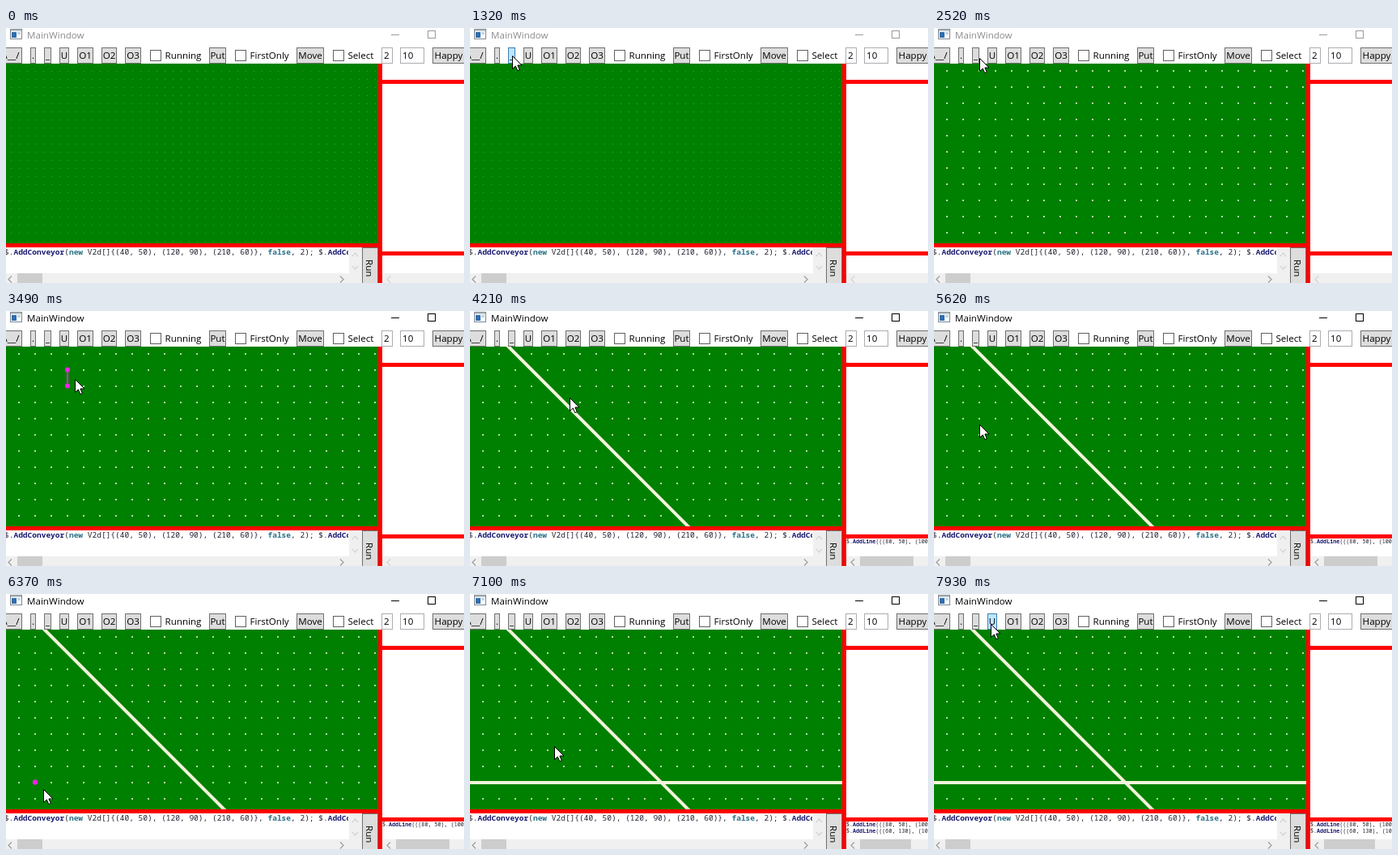
These frames come from a looping animation (566x315 px, 8 s). An HTML page:

```html
<!DOCTYPE html>
<html lang="en">
<head>
<meta charset="utf-8">
<title>MainWindow</title>
<style>
  html, body { margin: 0; width: 100%; height: 100%; overflow: hidden; background: #fff; }
  svg { display: block; width: 566px; height: 315px; }
  text { font: 11.6px "Open Sans", "Noto Sans", sans-serif; fill: #000; white-space: pre; }
  rect { shape-rendering: crispEdges; }
  .code text { font: 9.53px "Noto Sans Mono", "DejaVu Sans Mono", monospace; fill: #223; }
  .code .small { font-size: 6.72px; }
  .code tspan { font-weight: bold; }
  .call { fill: #191970; }
  .word { fill: #2a7088; }
  .btn rect { fill: #ddd; stroke: #707070; }
  .btn.hover rect { fill: #bee6fd; stroke: #3c7fb1; }
  .field { fill: #fff; stroke: #abadb3; }
  .check { fill: #fff; stroke: #606060; }
  .red { fill: #f00; }
  .bar { fill: #f0f0f0; }
  .thumb { fill: #cdcdcd; }
  .arrow { fill: none; stroke: #a0a0a0; stroke-width: 1.3; }
  .faint { stroke: #d4d4d4; }
  .belt { stroke: #f5f5dc; stroke-width: 4; }
  .draft { stroke: #ff20f0; fill: #ff20f0; stroke-width: 2; }
  .draft circle { stroke: none; }
</style>
</head>
<body>
<svg viewBox="0 0 566 315" xmlns="http://www.w3.org/2000/svg">
  <defs>
    <pattern id="dense" x="6" y="43" width="10" height="10" patternUnits="userSpaceOnUse">
      <rect width="1" height="1" fill="#3c9e3c"/>
    </pattern>
    <pattern id="sparse" x="15" y="52" width="20" height="20" patternUnits="userSpaceOnUse">
      <rect width="2" height="2" fill="#b4dcaa"/>
    </pattern>
    <clipPath id="stageClip"><rect y="44" width="460" height="222"/></clipPath>
    <clipPath id="editClip"><rect y="271" width="423" height="32"/></clipPath>
  </defs>
  <rect width="566" height="315" fill="#fff"/>

  <g id="titleBar">
    <rect x="5.5" y="1.5" width="14" height="12" fill="#fff" stroke="#7d8790"/>
    <rect x="6" y="2" width="13" height="2" fill="#b9c2ca"/>
    <rect x="7" y="5" width="6" height="7" fill="#2f6fae"/>
    <rect x="14" y="5" width="4" height="3" fill="#c9d3da"/>
    <text id="title" x="26" y="13">MainWindow</text>
    <g id="winKeys" fill="none">
      <path d="M476 8.5h10M521.5 3.5h9v9h-9z" shape-rendering="crispEdges"/>
    </g>
  </g>

  <g id="tools"></g>

  <rect y="44" width="460" height="222" fill="#008000"/>
  <rect id="grid" y="44" width="460" height="222"/>
  <g clip-path="url(#stageClip)">
    <path id="belt1" class="belt" d="M36 32.5L286 282.5"/>
    <path id="belt2" class="belt" d="M0 233H460"/>
    <g id="draft" class="draft">
      <line/><circle r="3"/><circle r="3"/>
    </g>
  </g>

  <g class="code">
    <g clip-path="url(#editClip)">
      <text x="-2" y="280">$.<tspan class="call">AddConveyor</tspan>(<tspan class="word">new</tspan> V2d[]{(40, 50), (120, 90), (210, 60)}, <tspan class="word">false</tspan>, 2); $.<tspan class="call">AddConveyor</tspan></text>
    </g>
    <text id="log1" class="small" x="465" y="287">$.<tspan class="call">AddLine</tspan>(((80, 50), (100, 70)));</text>
    <text id="log2" class="small" x="465" y="295">$.<tspan class="call">AddLine</tspan>(((60, 130), (100, 130)));</text>
  </g>

  <rect class="bar" x="424" y="271" width="16" height="32"/>
  <path class="arrow faint" d="M428 282l3.500-4 3.500 4M428 294l3.500 4 3.500-4"/>
  <rect class="bar" y="303" width="440" height="12"/>
  <rect class="thumb" x="14" y="303" width="31" height="12"/>
  <path class="arrow" d="M7 306.500l-4 4 4 4M413 306.500l4 4-4 4"/>
  <g class="btn">
    <rect x="440.500" y="271.500" width="19" height="50"/>
    <text transform="translate(445 286) rotate(90)">Run</text>
  </g>
  <rect class="bar" x="465" y="303" width="101" height="12"/>
  <rect id="logThumb" class="thumb" x="482" y="303" height="12"/>
  <path id="logArrow" class="arrow" d="M475 306.500l-4 4 4 4"/>

  <rect class="red" x="460" y="44" width="5" height="271"/>
  <rect class="red" y="266" width="460" height="5"/>
  <rect class="red" x="465" y="64" width="101" height="5"/>
  <rect class="red" x="465" y="276" width="101" height="5"/>

  <path id="pointer" d="M.5 .5V16.500L4.300 13L6.800 18.700L9.300 17.600L6.900 12H12z" fill="#fff" stroke="#000"/>
  <path id="caret" d="M-3-8h2.500l.5 .5 .5-.5H3M0-8V8M-3 8H3" fill="none" stroke="#000"/>
</svg>
<script>
const LOOP = 8000;
const $ = id => document.getElementById(id);

// Toolbar: [kind, left, right, label]
const tools = [
  ["btn", -6, 20, "\\__/"], ["btn", 30, 37, "."], ["btn", 47, 56, "_"],
  ["btn", 66, 78, "U"], ["btn", 88, 108, "O1"], ["btn", 118, 137, "O2"],
  ["btn", 147, 167, "O3"], ["check", 178, 192, "Running"],
  ["btn", 251, 272, "Put"], ["check", 283, 297, "FirstOnly"],
  ["btn", 359, 393, "Move"], ["check", 404, 418, "Select"],
  ["field", 464, 478, "2"], ["field", 487, 517, "10"], ["btn", 527, 567, "Happy"]
];

function make(parent, tag, attrs) {
  const el = document.createElementNS("http://www.w3.org/2000/svg", tag);
  for (const k in attrs) el.setAttribute(k, attrs[k]);
  return parent.appendChild(el);
}

const buttons = [];
for (const [kind, left, right, label] of tools) {
  const g = make($("tools"), "g", { class: kind === "btn" ? "btn" : "" });
  const isCheck = kind === "check";
  make(g, "rect", {
    class: kind === "btn" ? "" : kind,
    x: left + .5, y: isCheck ? 27.5 : 24.5,
    width: right - left - 1, height: isCheck ? 13 : 19
  });
  const x = isCheck ? right + 4.5 : kind === "field" ? left + 3 : (left + right) / 2;
  const text = make(g, "text", { x, y: 38, "text-anchor": kind === "btn" ? "middle" : "start" });
  text.textContent = label;
  if (kind === "btn") buttons.push({ g, left, right });
}

// Pointer path: [ms, x, y]
const path = [
  [160, 463, 302], [340, 401, 274], [520, 195, 152], [600, 150, 120],
  [760, 80, 62], [940, 52, 42], [990, 51, 38], [1120, 52, 35], [1320, 52, 34],
  [1460, 52, 34], [1720, 78, 115], [2140, 78, 115], [2520, 56, 37],
  [2870, 53, 36], [2950, 53, 36], [3250, 74, 70], [3490, 85, 84],
  [3740, 123, 107], [4300, 123, 107], [4420, 130, 115], [4880, 61, 45],
  [5150, 53, 36], [5200, 53, 36], [5450, 66, 100], [5960, 36, 220],
  [6200, 38, 236], [6370, 46, 241], [6570, 107, 241], [6700, 107, 241],
  [6890, 110, 224], [6980, 110, 224], [7400, 90, 100], [7710, 70, 40],
  [7800, 70, 40], [7930, 70, 37]
];

function pointerAt(t) {
  const i = path.findIndex(p => p[0] > t);
  if (i === 0) return null;
  if (i < 0) return path[path.length - 1].slice(1);
  const [t0, x0, y0] = path[i - 1], [t1, x1, y1] = path[i];
  const k = (t - t0) / (t1 - t0);
  return [Math.round(x0 + (x1 - x0) * k), Math.round(y0 + (y1 - y0) * k)];
}

// Lines being dragged: press and release times with the start point
const drags = [
  { from: 3250, to: 4210, x: 76, y: 72.5 },
  { from: 6250, to: 6760, x: 36, y: 232.5 }
];
// Halves round down so the end stays on the nearer dot
const snap = (v, base) => base + 20 * Math.ceil((v - base) / 20 - .5);
const show = (el, on) => { el.style.display = on ? "" : "none"; };

function drawDraft(t, mouse) {
  const drag = drags.find(d => t >= d.from && t < d.to);
  show($("draft"), drag);
  if (!drag) return;
  const x2 = snap(mouse[0], 16), y2 = snap(mouse[1], 52.5);
  const [line, a, b] = $("draft").children;
  const set = (el, attrs) => { for (const k in attrs) el.setAttribute(k, attrs[k]); };
  set(line, { x1: drag.x, y1: drag.y, x2, y2 });
  set(a, { cx: drag.x, cy: drag.y });
  set(b, { cx: x2, cy: y2 });
}

function drawPointer(mouse) {
  const [x, y] = mouse || [-99, -99];
  const inEditor = x >= 0 && x < 424 && y >= 271 && y < 303;
  show($("pointer"), mouse && !inEditor);
  show($("caret"), inEditor);
  $(inEditor ? "caret" : "pointer").setAttribute("transform", `translate(${x} ${y})`);
  for (const { g, left, right } of buttons)
    g.classList.toggle("hover", x >= left && x < right && y >= 24 && y < 44);
}

function draw(t) {
  const mouse = pointerAt(t);
  const active = t >= 2700, first = t >= 4210, second = t >= 6760;
  $("title").style.fill = active ? "#000" : "#8c8c8c";
  $("winKeys").style.stroke = active ? "#000" : "#999";
  $("grid").setAttribute("fill", `url(#${t < 1990 ? "dense" : "sparse"})`);
  show($("belt1"), first);
  show($("log1"), first);
  show($("belt2"), second);
  show($("log2"), second);
  show($("logThumb"), first);
  $("logThumb").setAttribute("width", second ? 63 : 66);
  $("logArrow").classList.toggle("faint", !first);
  drawDraft(t, mouse);
  drawPointer(mouse);
}

const start = performance.now();
function tick() {
  draw((performance.now() - start) % LOOP);
  requestAnimationFrame(tick);
}
tick();
</script>
</body>
</html>
```
